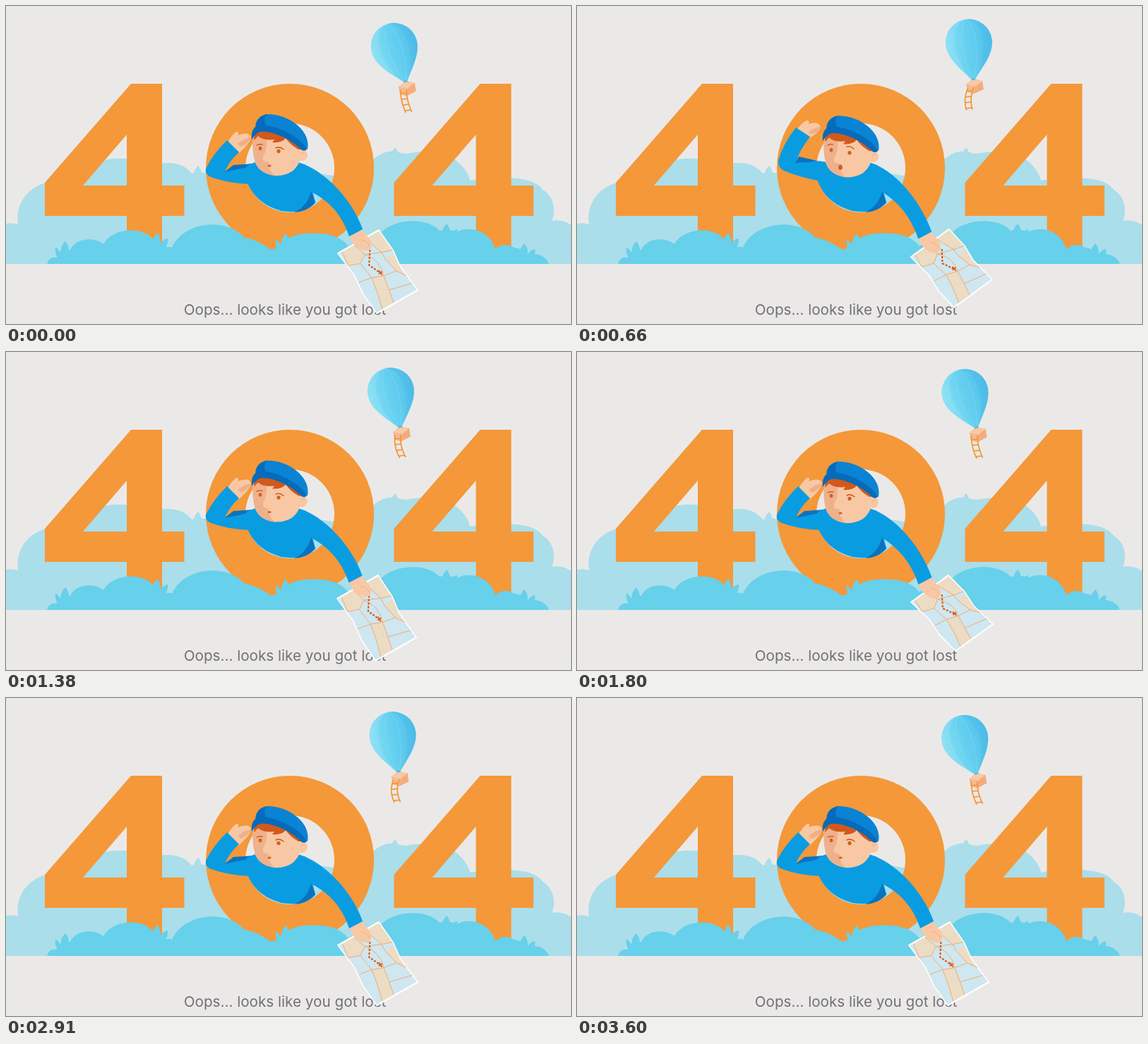
Write an HTML page that moves like this. It is 800 px wide and 450 px high and loops after 3630 ms.

```html
<!DOCTYPE html>
<html lang="en">
<head>
<meta charset="utf-8">
<title>Lost</title>
<style>
html, body { margin: 0; width: 100%; height: 100%; overflow: hidden; background: #ebe9e8; }
svg { display: block; width: 100vw; height: 100vh; }
text { font-family: Inter, "Open Sans", sans-serif; font-size: 20.7px; fill: #717174; }
.line { fill: none; vector-effect: non-scaling-stroke; }
</style>
</head>
<body>
<svg viewBox="0 0 800 450">
  <defs>
    <linearGradient id="sky">
      <stop offset="0" stop-color="#86dff3"/>
      <stop offset=".45" stop-color="#66d0f0"/>
      <stop offset="1" stop-color="#50bfe9"/>
    </linearGradient>
    <path id="four" fill-rule="evenodd" d="M177 110H221V254H252.500V297H221V344H171V297H55V250ZM171 182L109 254H171Z"/>
    <path id="leaf" d="M-4 15C-12 11-14 3-13-5C-8-1-5 3-4 7C-7 0-5-7 1-13C6-7 7 0 4 7C6 0 10-4 16-5C17 3 13 11 4 15Z"/>
    <path id="sheet" d="M0 0H100L102 34L96 60L100 100H0L-2 66L4 38Z"/>
  </defs>

  <rect width="800" height="450" fill="#ebe9e8"/>

  <g fill="#aadeea">
    <path d="M0 365V308Q9 306 17 309C13 284 27 258 57 250Q75 218 125 223C142 213 185 213 203 226Q245 214 263 237Q276 232 288 240Q340 215 385 242Q420 232 450 238Q482 245 512 231Q519 211 541 206Q553 205 564 210Q600 200 635 217Q653 230 657 247Q690 240 722 244Q750 246 760 260C776 270 779 289 773 304Q788 301 800 310V365Z"/>
    <use href="#leaf" x="271" y="239"/>
    <use href="#leaf" x="550" y="213"/>
  </g>

  <g id="balloon">
    <g id="envelope">
      <path fill="url(#sky)" d="M-33 0A33 33 0 0 1 33 0C33 20 15 37 3 52H-3C-15 37-33 20-33 0Z"/>
      <path fill="#a3e7f6" opacity=".25" d="M0-33C-26-26-27 16-3 52C-15 37-33 20-33 0A33 33 0 0 1 0-33Z"/>
      <path fill="#2fa6dc" opacity=".14" d="M0-33C27-25 26 18 3 52C15 37 33 20 33 0A33 33 0 0 0 0-33Z"/>
      <path fill="none" stroke="#8ee0f5" stroke-width=".7" opacity=".6" d="M0-33C-13-20-12 22-1 52M0-33C13-20 12 22 1 52"/>
      <path fill="#50bfe9" d="M-3 51H3L2 56H-2Z"/>
    </g>
    <g id="basket">
      <path stroke="#e6a06b" stroke-width=".7" fill="none" d="M-3-10L-11-2M-1-10L11-7M-2-10L0 0"/>
      <path fill="#f8c9a4" d="M-12-3L-2-9L11-8L1 0Z"/>
      <path fill="#f5b98e" d="M-12-3L1 0L-1 11L-10 8Z"/>
      <path fill="#f3ad7d" d="M1 0L11-8L13 4L-1 11Z"/>
    </g>
    <path id="ladder" fill="none" stroke="#f4983a" stroke-width="1.8"/>
  </g>

  <g fill="#f4983a">
    <use href="#four"/>
    <use href="#four" x="494.400"/>
    <path fill-rule="evenodd" d="M283 229a119 119 0 1 1 238 0a119 119 0 1 1-238 0ZM339 229a63 63 0 1 0 126 0a63 63 0 1 0-126 0Z"/>
  </g>

  <g fill="#67d0eb">
    <path d="M58 365Q61 354 72 356Q74 345 91 345C98 328 125 326 138 337C150 314 193 311 208 330Q219 329 223 343Q230 339 235 342C250 306 311 297 338 328Q355 330 376 345L386 341Q398 324 424 322Q468 318 485 340Q498 328 521 339C528 302 592 294 614 318Q628 314 638 320C661 309 686 321 693 344Q704 333 720 342Q731 343 736 351Q762 348 769 365Z"/>
    <use href="#leaf" x="83" y="346"/>
    <use href="#leaf" x="213" y="334"/>
    <use href="#leaf" x="395" y="335"/>
    <use href="#leaf" x="623" y="321"/>
    <use href="#leaf" x="733" y="349"/>
  </g>

  <text x="395" y="437" text-anchor="middle">Oops... looks like you got lost</text>

  <g id="map">
    <use href="#sheet" fill="#cfe7f0"/>
    <g fill="#ecdcc4">
      <path d="M66 0H100L102 34L79 29Z"/>
      <path d="M10 0H38L47 20L28 28L4 22Z"/>
      <path d="M78 40L101 38L96 60L98 76L84 62Z"/>
      <path d="M32 53L56 59L49 80L42 100H14L25 75Z"/>
    </g>
    <path class="line" stroke="#f2aa74" d="M10 0L4 22L28 28L47 20L38 0M66 0L79 29L102 34M47 20L79 29L78 40L84 62L98 76M28 28L32 53L25 75L14 100M32 53L4 50M32 53L56 59L84 62M56 59L49 80L42 100M49 80L99 88M47 20Q68 38 56 59"/>
    <use href="#sheet" class="line" stroke="#fff" stroke-width="2.2" style="vector-effect:none"/>
    <path class="line" stroke="#e0560f" stroke-width="2.2" stroke-dasharray="3 2" d="M61 18L42 36L53 53"/>
    <path class="line" stroke="#e0560f" stroke-width="1.8" d="M49 53H58M53.5 49V57"/>
  </g>

  <g id="grip">
    <path fill="#f8c8a4" d="M486 325L504 316Q511 325 516 331Q520 341 513 346Q505 347 499 342Q490 337 486 325Z"/>
    <path fill="none" stroke="#eeb08a" stroke-width="1" d="M503 331Q512 332 515 340"/>
  </g>

  <path id="palm" fill="#f8c8a4"/>
  <path id="fingers" fill="#eeb08a"/>
  <path id="sleeve" fill="#0a9ce1"/>
  <path id="crook" fill="#0873c1"/>
  <path fill="#0a9ce1" d="M341 226L341 248Q353 280 390 290Q422 295 438 278L433 258L425 225L400 217H362Z"/>
  <path id="arm" fill="#0a9ce1"/>
  <path fill="#0873c1" d="M432 262L438 278Q427 291 408 292Q427 283 432 262Z"/>

  <g id="head">
    <circle cx="419" cy="211" r="8" fill="#f8c8a4"/>
    <path fill="none" stroke="#eeb08a" stroke-width="1.3" d="M417 213Q418 206 423 208"/>
    <path fill="#f8c8a4" d="M350 180L400 180L418 200Q420 222 405 234Q394 241 380 240Q360 237 353 222Q348 207 350 180Z"/>
    <path fill="#efb18c" d="M350 183Q347 216 358 230Q366 238 380 240Q371 232 372 221L365 219Q362 215 367 207Q370 198 369 183Z"/>
    <path fill="#d2591b" d="M351 190Q351 173 364 172L405 182L422 203L414 203Q402 196 396 187Q391 194 377 193L380 189Q364 191 357 184Z"/>
    <path fill="#0a83d4" d="M353 174Q352 157 369 153Q394 153 413 169Q430 184 427 203Q415 195 400 184L366 172Z"/>
    <path fill="#066bba" d="M354 172Q353 158 369 153Q363 161 369 173Z"/>
    <path fill="#066bba" d="M348 189Q346 173 358 168Q382 168 407 184Q419 191 426 203Q423 206 419 204Q400 186 378 180Q359 175 355 181Q351 184 348 189Z"/>
    <g fill="#d0601f">
      <ellipse cx="360" cy="201.500" rx="2.300" ry="2.700"/>
      <ellipse cx="386" cy="205.500" rx="2.600" ry="2.700"/>
      <ellipse id="mouth" cx="373" cy="226"/>
    </g>
    <path id="brows" fill="none" stroke="#d0601f" stroke-width="1.5" stroke-linecap="round"/>
  </g>
</svg>
<script>
const LOOP = 3630;
const el = id => document.getElementById(id);
const put = (id, name, value) => el(id).setAttribute(name, value);
const lerp = (a, b, k) => a + (b - a) * k;

// time, sink, calm, then the map's corner and its two edges
const rest = [0, 1, 470, 350, 58, -33, 55, 85];
const keys = [
  [0, ...rest],
  [330, 1, 0, 470, 359, 53, -39, 60, 68],
  [960, .2, 0, 475, 352, 55, -40, 62, 74],
  [1400, .1, 1, 469, 349, 58, -33, 54, 88],
  [1800, .5, 1, 473, 354, 53, -38, 63, 69],
  [2460, .7, 1, 470, 353, 55, -35, 61, 82],
  [2910, ...rest],
  [LOOP, ...rest]
];

function pose(t) {
  const i = keys.findIndex(k => k[0] > t);
  const a = keys[i - 1], b = keys[i];
  const k = (1 - Math.cos(Math.PI * (t - a[0]) / (b[0] - a[0]))) / 2;
  return a.slice(1).map((v, n) => lerp(v, b[n + 1], k));
}

// blends two paths that share the same commands
function blend(a, b, k) {
  const to = b.match(/-?[\d.]+/g);
  let n = 0;
  return a.replace(/-?[\d.]+/g, v => lerp(+v, +to[n++], k).toFixed(2));
}

const shapes = {
  palm: ["M311 176Q317 166 325 162Q330 162 328 167Q341 162 345 171Q344 179 327 188Z",
         "M314 193Q319 183 326 178Q331 178 328 183Q345 177 347 186Q346 194 329 209Z"],
  fingers: ["M328 178Q337 171 345 171Q343 180 329 181Z",
            "M328 195Q338 187 347 186Q344 195 332 199Z"],
  sleeve: ["M310 172Q292 194 285 219Q284 228 293 233Q314 242 345 248L354 221Q335 217 310 221Q315 204 330 185Z",
           "M313 190Q294 208 283 230Q281 238 290 242Q315 251 345 252L352 223Q331 224 310 234Q317 218 330 207Z"],
  crook: ["M309 222L314 213L340 219L328 221Z",
          "M309 235L322 225L352 223L338 229Z"],
  brows: ["M355 195Q358 192 362 194M382 197Q387 195 392 200",
          "M355 197Q358 195 363 196M382 201Q387 198 393 203"]
};

function drawBalloon(t) {
  const wave = peak => Math.cos((t - peak) / LOOP * 4 * Math.PI);
  const x = 550.3 + 5.5 * wave(490);
  const y = 54 + 3 * wave(-90);
  const tilt = 12.2 + 6 * wave(-100);
  const rad = tilt * Math.PI / 180;
  const bx = x + 54 * Math.sin(rad) + 1.5;
  const by = y + 54 * Math.cos(rad) + 8.5;
  put("envelope", "transform", `translate(${x} ${y}) rotate(${-tilt})`);
  put("basket", "transform", `translate(${bx} ${by}) rotate(${4 - tilt * .3})`);

  const swing = 3 - 5.5 * wave(720);
  const bow = -2 + 2 * wave(-100);
  const rail = k => [bx - 9 + swing * k * k + bow * 4 * k * (1 - k), by + 2 + 32 * k];
  let left = "", right = "", rungs = "";
  for (let i = 0; i <= 12; i++) {
    const [rx, ry] = rail(i / 12);
    const c = i ? "L" : "M";
    left += `${c}${rx} ${ry}`;
    right += `${c}${rx + 8.5} ${ry - 1}`;
    if (i % 3 === 2) rungs += `M${rx} ${ry}l8.5 -1`;
  }
  put("ladder", "d", left + right + rungs);
}

function drawBoy(t) {
  const [sink, calm, x, y, ux, uy, vx, vy] = pose(t);
  for (const id in shapes) put(id, "d", blend(...shapes[id], calm));
  put("mouth", "rx", lerp(2.8, 2.6, calm));
  put("mouth", "ry", lerp(3.8, 1.5, calm));
  put("head", "transform", `translate(0 ${4 * sink})`);

  const dx = -5 * sink, dy = 6 * sink;
  put("grip", "transform", `translate(${dx} ${dy})`);
  put("arm", "d", `M403 233L416 222C449 232 ${489 + dx} ${271 + dy} ${505 + dx} ${316 + dy}L${486 + dx} ${326 + dy}Q${471 + dx} ${281 + dy} 430 262Z`);
  put("map", "transform", `matrix(${[ux / 100, uy / 100, vx / 100, vy / 100, x, y]})`);
}

const start = performance.now();
function frame(now) {
  const t = Math.max(0, now - start) % LOOP;
  drawBalloon(t);
  drawBoy(t);
  requestAnimationFrame(frame);
}
frame(start);
</script>
</body>
</html>
```
